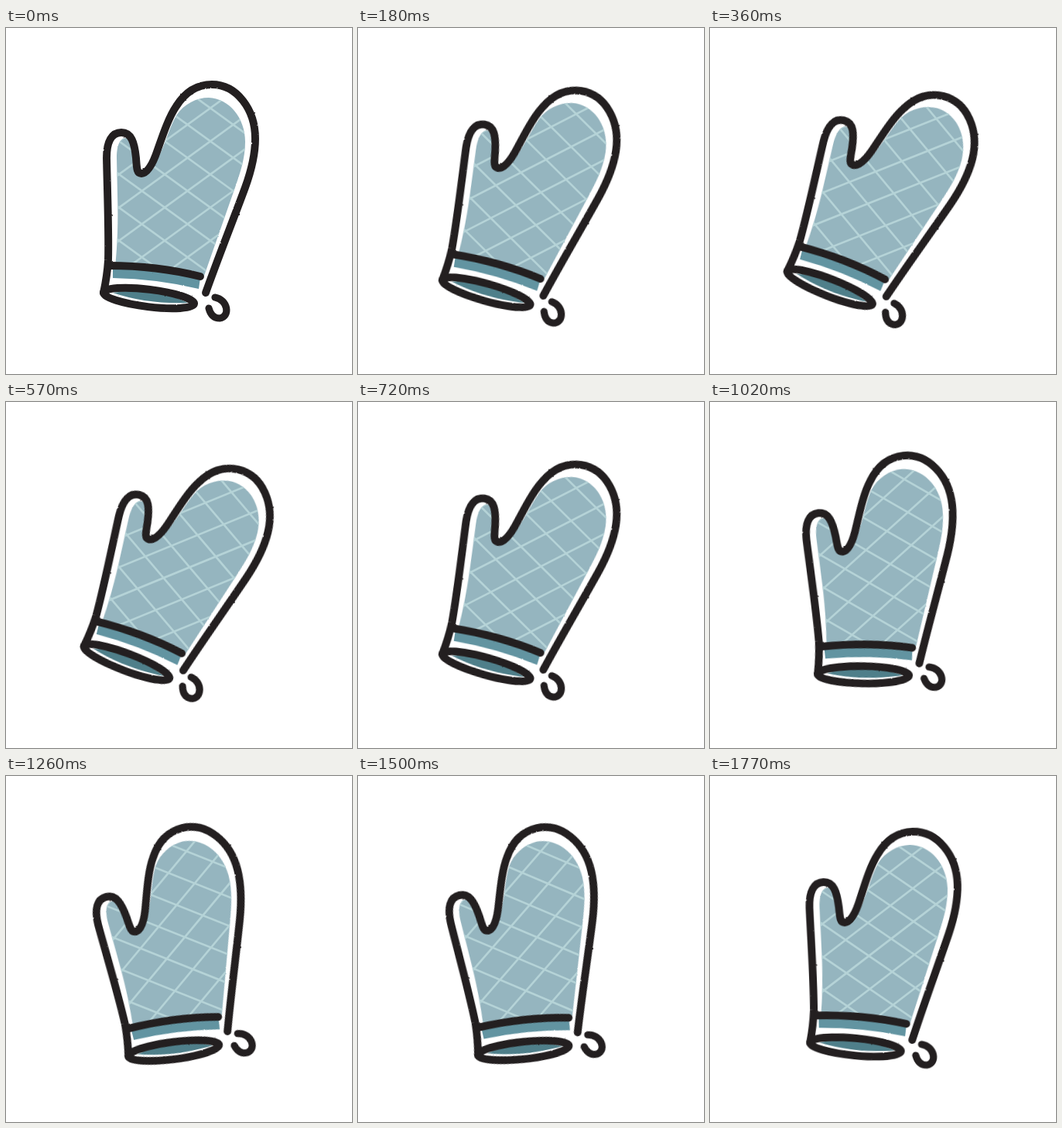
Recreate the animation shown at these times as an HTML page. Size 447 px wide and 447 px high, loop 1800 ms.

```html
<!DOCTYPE html>
<html lang="en">
<head>
<meta charset="utf-8">
<title>Oven mitt</title>
<style>
html, body { margin: 0; width: 100%; height: 100%; overflow: hidden; background: #fff; }
svg { display: block; width: 100vw; height: 100vh; }
.ink { fill: none; stroke: #231f20; stroke-width: 9.9; stroke-linecap: round; stroke-linejoin: round; }
</style>
</head>
<body>
<svg viewBox="0 0 447 447">
  <defs>
    <filter id="rough" filterUnits="userSpaceOnUse" x="90" y="40" width="270" height="360" color-interpolation-filters="sRGB">
      <feTurbulence type="fractalNoise" baseFrequency=".25" numOctaves="1" seed="4"/>
      <feDisplacementMap in="SourceGraphic" scale="2" xChannelSelector="R" yChannelSelector="G"/>
    </filter>
    <clipPath id="cloth">
      <path id="shape" d="M141 308C144 280 145 250 144 215L143 168C143 150 148 142 155 142C165 144 166 160 168 178
        C171 193 180 193 188 182C204 160 208 134 220 113C230 98 246 90 262 90C288 91 309 116 309 147
        C309 168 303 186 296 206L256 320C220 311 180 307 141 308Z"/>
    </clipPath>
  </defs>
  <g id="mitt">
    <use href="#shape" fill="#95b5bf" filter="url(#rough)"/>
    <path id="quilt" clip-path="url(#cloth)" fill="none" stroke="#b5d3d7" stroke-width="2.6"/>
    <g filter="url(#rough)">
      <path fill="#6294a1" d="M138 309Q195 309 251 323L249 337Q195 324 138 323Z"/>
      <path fill="#4f7f8a" d="M138 342Q190 334 235 355Q182 357 138 342Z"/>
      <g class="ink">
        <path d="M126 342C129 328 131 316 132 300C133 265 131 215 130 168C130 146 137 135 149 135
          C162 135 166 148 168 168C169 182 169 188 175 188C183 188 190 175 196 157C204 134 211 114 220 101
          C232 82 248 73 266 73C298 73 322 105 322 143C322 164 317 184 309 206C292 252 274 297 258 342"/>
        <path d="M133 307Q195 307 251 321"/>
        <ellipse cx="184.5" cy="349" rx="59" ry="11.2" transform="rotate(7 184.5 349)"/>
        <path stroke-width="9.2" d="M270 348C287 351 290 373 276 375C268 375 264 370 262 362"/>
      </g>
    </g>
  </g>
</svg>
<script>
const LOOP = 1800, STEP = 30, SWING = 15;
const mitt = document.getElementById("mitt");

// Diamond quilting: two families of parallel diagonals
const cellW = 59, cellH = 42.8, midX = 234.5, midY = 210.5;
let lines = "";
for (let i = -8; i <= 8; i++) {
  const x = midX + cellW * i;
  for (const side of [-1, 1]) {
    lines += `M${x + side * 5 * cellW} ${midY - 5 * cellH}l${-side * 10 * cellW} ${10 * cellH}`;
  }
}
document.getElementById("quilt").setAttribute("d", lines);

function draw() {
  const t = Math.floor(performance.now() % LOOP / STEP) * STEP;
  const angle = SWING * Math.sin(2 * Math.PI * t / LOOP);
  mitt.setAttribute("transform", `rotate(${angle} 223.5 223.5)`);
  requestAnimationFrame(draw);
}
draw();
</script>
</body>
</html>
```
